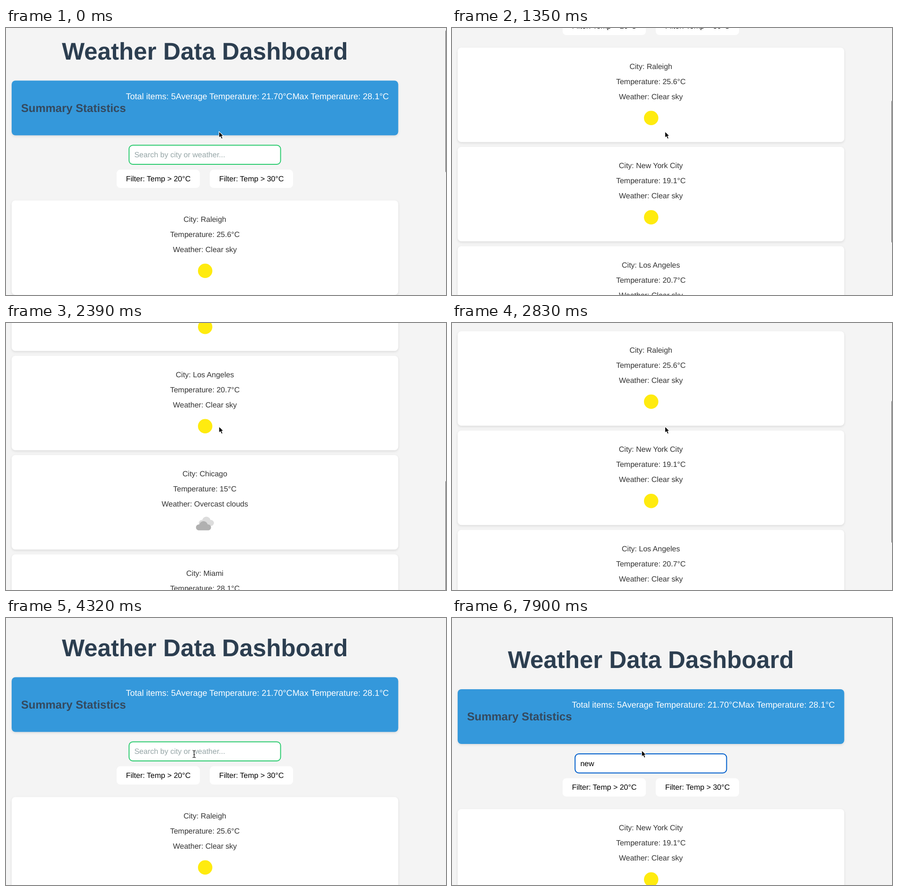
An HTML page that plays this animation: 935x566 px, repeating every 8 s.

```html
<!DOCTYPE html>
<html lang="en">
<head>
<meta charset="utf-8">
<title>Weather Data Dashboard</title>
<style>
  html, body { margin: 0; width: 100%; height: 100%; overflow: hidden; background: #f4f4f4; }
  svg { display: block; width: 935px; height: 566px; }
  text { font: 16px "Liberation Sans", Arial, sans-serif; text-rendering: geometricPrecision; }
  .mid { text-anchor: middle; }
  .end { text-anchor: end; }
  .title { font-size: 51.2px; font-weight: bold; fill: #2c3e50; }
  .heading { font-size: 24px; font-weight: bold; fill: #34495e; }
  .stat { font-size: 18px; fill: #fff; }
  .hint { fill: #95a5a6; }
  .panel { filter: drop-shadow(0 2px 2.5px rgba(0, 0, 0, .1)); }
  .row { fill: #333; }
</style>
</head>
<body>
<svg id="stage" viewBox="0 0 935 566"></svg>
<script>
const LOOP = 8000, TICK = 148.7;
const MID = 422.6, LEFT = 272.7, CARD_TOP = 365.5, PITCH = 210.5;
const stage = document.getElementById('stage');

function add(parent, tag, attrs, text) {
  const el = document.createElementNS('http://www.w3.org/2000/svg', tag);
  for (const k in attrs) el.setAttribute(k, attrs[k]);
  if (text) el.textContent = text;
  parent.append(el);
  return el;
}
const label = (parent, x, y, cls, text) => add(parent, 'text', { x, y, class: cls }, text);
const box = (parent, x, y, width, height, fill, cls = '') =>
  add(parent, 'rect', { x, y, width, height, rx: 8, fill, class: cls });
const move = (el, x, y) => el.setAttribute('transform', `translate(${x} ${y})`);
const show = (el, on) => el.setAttribute('visibility', on ? 'visible' : 'hidden');

// Header, search field and buttons
const page = add(stage, 'g');
label(page, MID, 66.7, 'title mid', 'Weather Data Dashboard');
box(page, 12, 111.5, 821.5, 116, '#3498db', 'panel');
label(page, 32, 177.7, 'heading', 'Summary Statistics');
label(page, 254.8, 150.7, 'stat', 'Total items: 5');
label(page, 608.4, 150.7, 'stat end', 'Average Temperature: 21.70°C');
label(page, 813.6, 150.7, 'stat end', 'Max Temperature: 28.1°C');

const field = box(page, 261.5, 248.5, 322, 40.5, '#fff');
field.setAttribute('stroke-width', 2);
const hint = label(page, LEFT, 274, 'hint', 'Search by city or weather...');
const typed = label(page, LEFT, 274, '', '');
const caret = add(page, 'rect', { y: 260, width: 1, height: 18 });

[[235, 20], [433, 30]].forEach(([x, deg]) => {
  box(page, x, 300.3, 177, 38.7, '#fff');
  label(page, x + 88.6, 324.8, 'mid', `Filter: Temp > ${deg}°C`);
});

// City cards
function sun(g) {
  add(g, 'circle', { cx: 423.2, cy: 149.2, r: 15.3, fill: '#ffeb0f' });
}
function cloud(g, x, y, fill) {
  add(g, 'rect', { x, y: y + 7, width: 32, height: 12.6, rx: 6.3, fill });
  add(g, 'circle', { cx: x + 16, cy: y + 9, r: 9, fill });
}
function clouds(g) {
  cloud(g, 409.8, 130.6, '#dcdcdc');
  cloud(g, 403.7, 140, '#b0b0b0');
}
const cards = [
  ['Raleigh', 25.6, 'Clear sky'],
  ['New York City', 19.1, 'Clear sky'],
  ['Los Angeles', 20.7, 'Clear sky'],
  ['Chicago', 15, 'Overcast clouds'],
  ['Miami', 28.1, 'Clear sky']
].map(([city, temp, sky]) => {
  const g = add(page, 'g');
  box(g, 12, 0, 821.5, 200.3, '#fff', 'panel');
  [`City: ${city}`, `Temperature: ${temp}°C`, `Weather: ${sky}`]
    .forEach((s, i) => label(g, MID, 45.3 + 32 * i, 'mid row', s));
  (sky.includes('clouds') ? clouds : sun)(g);
  return { g, key: `${city} ${sky}`.toLowerCase() };
});

// Overlays
const strip = add(stage, 'rect', { width: 935, height: 2, fill: '#fff' });
const thumb = add(stage, 'rect', { x: 933.8, width: 4, rx: 2, fill: '#6f6f6f' });
const arrow = add(stage, 'path', {
  d: 'M.6.8V14.4L3.7 11.5 5.9 16.6 8.5 15.5 6.3 10.5H10.4Z',
  stroke: '#fff', 'stroke-width': 1.1, 'stroke-linejoin': 'round'
});
const beam = add(stage, 'g', { fill: 'none', 'stroke-linecap': 'round' });
['#fff', '#111'].forEach((stroke, i) => add(beam, 'path', {
  d: 'M-3-7.5Q-.3-7.5 0-6 .3-7.5 3-7.5M0-6V6M-3 7.5Q-.3 7.5 0 6 .3 7.5 3 7.5M-1.5 1.5H1.5',
  stroke, 'stroke-width': i ? 1.2 : 2.6
}));

// Motion: k counts ticks, each phase runs from tick a to tick b
const ramp = (k, a, b) => Math.min(1, Math.max(0, (k - a) / (b - a)));
const easeIn = u => u * u;
const easeOut = u => 1 - easeIn(1 - u);
const smooth = u => u * u * (3 - 2 * u);

// Two swipes down, a fling back past the top, then a slow settle
const scrollAt = k => Math.round(
  171.4 * smooth(ramp(k, 0, 6)) +
  152.6 * easeIn(ramp(k, 7, 9)) +
  393 * easeOut(ramp(k, 9, 16)) -
  738 * smooth(ramp(k, 16, 22)) +
  7 * ramp(k, 22, 27));

const FOCUS = 33, TYPE = 41, WORD = 'new';

function draw(t) {
  const k = Math.floor(t / TICK);
  const query = WORD.slice(0, Math.max(0, k - TYPE + 1));
  const s = scrollAt(k), over = Math.max(0, -14 - s);

  let hits = 0;
  for (const { g, key } of cards) {
    const hit = key.includes(query);
    show(g, hit);
    if (hit) move(g, 0, CARD_TOP + PITCH * hits++);
  }
  // A single card fits the window, so the page is centred
  const single = hits === 1;
  move(page, 0, single ? 25.5 - s : -s);

  field.setAttribute('stroke', k < FOCUS ? '#2ecc71' : '#005fcc');
  show(hint, !query);
  typed.textContent = query;
  caret.setAttribute('x', LEFT - .2 + typed.getComputedTextLength());
  const lastKey = query ? Math.min(k, TYPE + WORD.length - 1) : FOCUS;
  show(caret, k >= FOCUS && Math.floor((k - lastKey) / 3) % 2 === 0);

  show(strip, over && k < 25);
  thumb.setAttribute('y', Math.max(0, (s + 14) * .46 - 1.5));
  thumb.setAttribute('height', 301 - Math.min(over, 2));
  thumb.setAttribute('opacity', 1 - ramp(k, 24, 27));

  const glide = ramp(k, 24, 27), nudge = ramp(k, 28, 31);
  const inField = glide === 1 && !single;
  show(arrow, !inField);
  show(beam, inField);
  const x = 452 - 54.5 * glide + 7 * nudge, y = 218.5 + 72.5 * glide - 8.2 * nudge;
  if (inField) move(beam, x, y);
  else move(arrow, x - 2 * nudge, y - 3 * nudge);
}

function tick() {
  draw(performance.now() % LOOP);
  requestAnimationFrame(tick);
}
tick();
</script>
</body>
</html>
```
